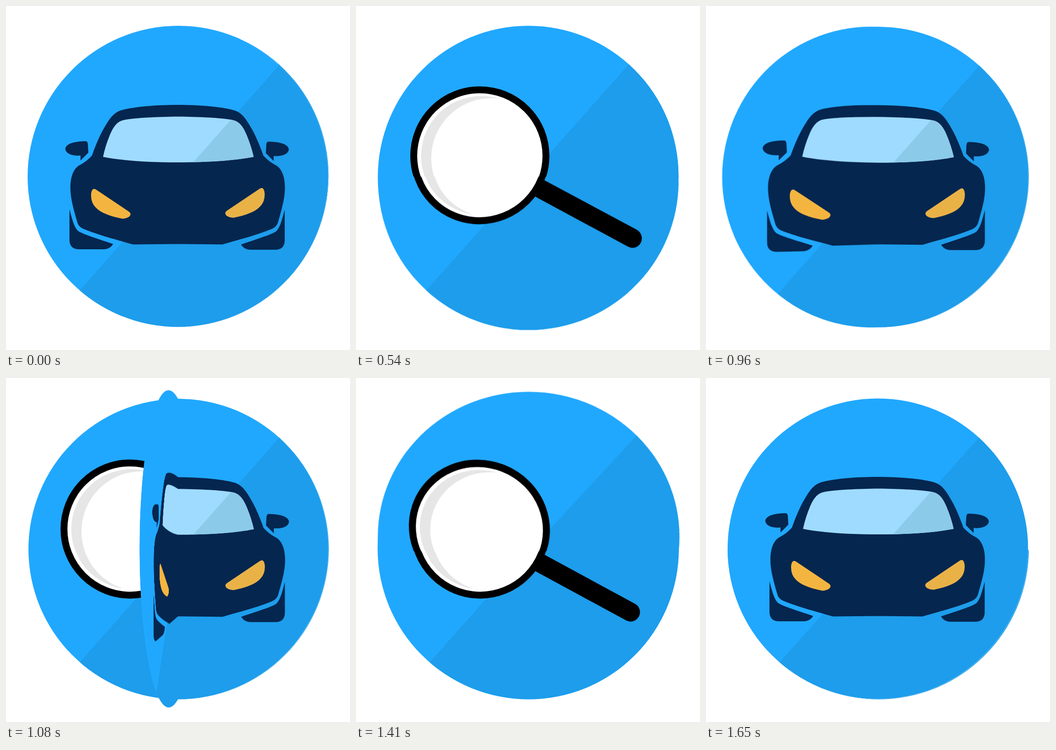
These frames come from a looping animation (748 px wide and 748 px high, 1800 ms). An HTML page:

```html
<!DOCTYPE html>
<html lang="en">
<head>
<meta charset="utf-8">
<title>Car and magnifier flip</title>
<style>
  html, body { margin: 0; width: 100%; height: 100%; overflow: hidden; background: #fff; }
  .scene, .leaf, .pic { position: absolute; left: 0; top: 0; width: 748px; height: 748px; }
  .defs { position: absolute; width: 0; height: 0; }
  .scene { background: #fff; overflow: hidden; perspective: 1000px; }
  .leaf { transform-style: preserve-3d; }
  .leaf .pic { backface-visibility: hidden; }

  .left { clip-path: inset(0 50% 0 0); }
  .right { clip-path: inset(0 0 0 50%); }
  .top { clip-path: inset(0 0 50% 0); }
  .bottom { clip-path: inset(50% 0 0 0); }
  .back.left, .back.right { transform: rotateY(180deg); }
  .back.top, .back.bottom { transform: rotateX(180deg); }

  /* the hinge of the horizontal leaves sits slightly off the middle */
  .up .front { transform: translateY(-3px); }
  .down .front { transform: translateY(3px); }

  /* started a touch early so every 30 ms step is already in place */
  .scene, .leaf { animation: 1800ms step-end -4ms infinite; }
  .up { animation-name: show-up; }
  .over { animation-name: show-over; }
  .down { animation-name: show-down; }
  .back-over .leaf { animation-name: turn-back-over; }
  .up .leaf { animation-name: turn-up; }
  .over .leaf { animation-name: turn-over; }
  .down .leaf { animation-name: turn-down; }

  @keyframes show-up { 0% { visibility: hidden } 30%, 100% { visibility: visible } }
  @keyframes show-over { 0% { visibility: hidden } 53.3333%, 100% { visibility: visible } }
  @keyframes show-down { 0% { visibility: hidden } 76.6667%, 100% { visibility: visible } }

  @keyframes turn-back-over {
    0% { transform: rotateY(0deg) }
    1.6667% { transform: rotateY(0deg); animation-timing-function: steps(10) }
    18.3333%, 100% { transform: rotateY(-180deg) }
  }
  @keyframes turn-up {
    0% { transform: rotateX(8deg) }
    30% { transform: rotateX(8deg); animation-timing-function: steps(9) }
    45% { transform: rotateX(170deg) }
    46.6667%, 100% { transform: rotateX(180deg) }
  }
  @keyframes turn-over {
    0% { transform: rotateY(8deg) }
    53.3333% { transform: rotateY(8deg); animation-timing-function: steps(9) }
    68.3333% { transform: rotateY(170deg) }
    70%, 100% { transform: rotateY(180deg) }
  }
  @keyframes turn-down {
    0% { transform: rotateX(-3deg) }
    76.6667% { transform: rotateX(-3deg) }
    78.3333% { transform: rotateX(-17deg); animation-timing-function: steps(7) }
    90% { transform: rotateX(-160deg) }
    91.6667%, 100% { transform: rotateX(-180deg) }
  }
</style>
</head>
<body>
<svg class="defs" aria-hidden="true">
  <defs>
    <clipPath id="shade"><path d="M858-169L-16 817H858Z"/></clipPath>

    <path id="body" d="M374 215C325 215 280 219 253 226C232 231 222 250 210 271C200 290 193 308 187 325
      C180 333 170 341 160 346C144 355 140 377 140 395C140 420 148 445 155 470C157 477 161 481 168 484.500
      C200 498 240 508 276 518.500L374 517.500Z"/>
    <path id="side" d="M129 311C130 299 150 294 174 294Q177 294 178 300L179 319L162 336V325C145 327 130 321 129 311Z
      M138 442C143 460 147 479 156 488.500C164 495 190 503 233 517.500C228 525 222 529 212 529H159Q138 529 138 508Z"/>
    <path id="glass" d="M375 240.500C330 241 280 243 256 248C240 251 232 266 226 280Q216 304 211 328
      C250 336 310 340 375 340C439 340 499 336 538.500 328Q533 304 523 280C517 266 509 251 493 248C469 243 419 241 375 240.500Z"/>
    <path id="lamp" d="M185 412C185 405 187 399 190 398Q193 397 197 400L267 447Q274 452 268 458Q262 462 253 462.500
      C225 457 205 449 195 438Q185 428 185 412Z"/>

    <g id="car">
      <circle cx="374.100" cy="371.500" r="326.500" fill="#a9cfe4"/>
      <circle cx="373.500" cy="371" r="326.500" fill="#20a8ff"/>
      <circle cx="373.500" cy="371" r="326.500" fill="#1d9deb" clip-path="url(#shade)"/>
      <g fill="#05264f">
        <use href="#body"/>
        <use href="#body" transform="translate(746.500) scale(-1 1)"/>
        <path d="M372 215h4v302.500h-4z"/>
        <use href="#side"/>
        <use href="#side" transform="translate(744 1) scale(-1 1)"/>
      </g>
      <use href="#glass" fill="#9fdbff"/>
      <g clip-path="url(#shade)"><use href="#glass" fill="#8ccaea"/></g>
      <use href="#lamp" fill="#f4b540"/>
      <use href="#lamp" fill="#e9b247" transform="translate(747.500 -2) scale(-1 1)"/>
    </g>
    <use id="car-low" href="#car" transform="translate(.4 .7)"/>

    <g id="lens">
      <circle cx="375.300" cy="372" r="326.500" fill="#20a8ff"/>
      <circle cx="375.300" cy="372" r="326.500" fill="#1d9deb" clip-path="url(#shade)"/>
      <path d="M396 400L597 509" stroke="#000" stroke-width="41" stroke-linecap="round"/>
      <circle cx="269.800" cy="328.400" r="143.750" fill="#fff" stroke="#000" stroke-width="15"/>
      <path d="M311 204A130.500 130.500 0 1 0 255 458A130.600 130.600 0 0 1 311 204Z" fill="#e6e6e6"/>
    </g>
    <use id="lens-high" href="#lens" transform="translate(-.5 -2.500)"/>
  </defs>
</svg>
<script>
  // each flip lifts one half of the old picture and lays it down on the opposite side
  const flips = [
    { name: 'back-over', from: 'car', to: 'lens-high', lift: 'right', land: 'left' },
    { name: 'up', from: 'lens-high', to: 'car-low', lift: 'bottom', land: 'top' },
    { name: 'over', from: 'car-low', to: 'lens', lift: 'left', land: 'right' },
    { name: 'down', from: 'lens', to: 'car', lift: 'top', land: 'bottom' }
  ];

  const pic = (id, cls = '') =>
    `<svg class="pic ${cls}" viewBox="0 0 748 748"><use href="#${id}"/></svg>`;

  const scene = ({ name, from, to, lift, land }) => `
    <div class="scene ${name}">
      ${pic(to)}
      ${pic(from, land)}
      <div class="leaf">${pic(from, 'front ' + lift)}${pic(to, 'back ' + land)}</div>
    </div>`;

  document.body.insertAdjacentHTML('beforeend', flips.map(scene).join(''));
</script>
</body>
</html>
```
